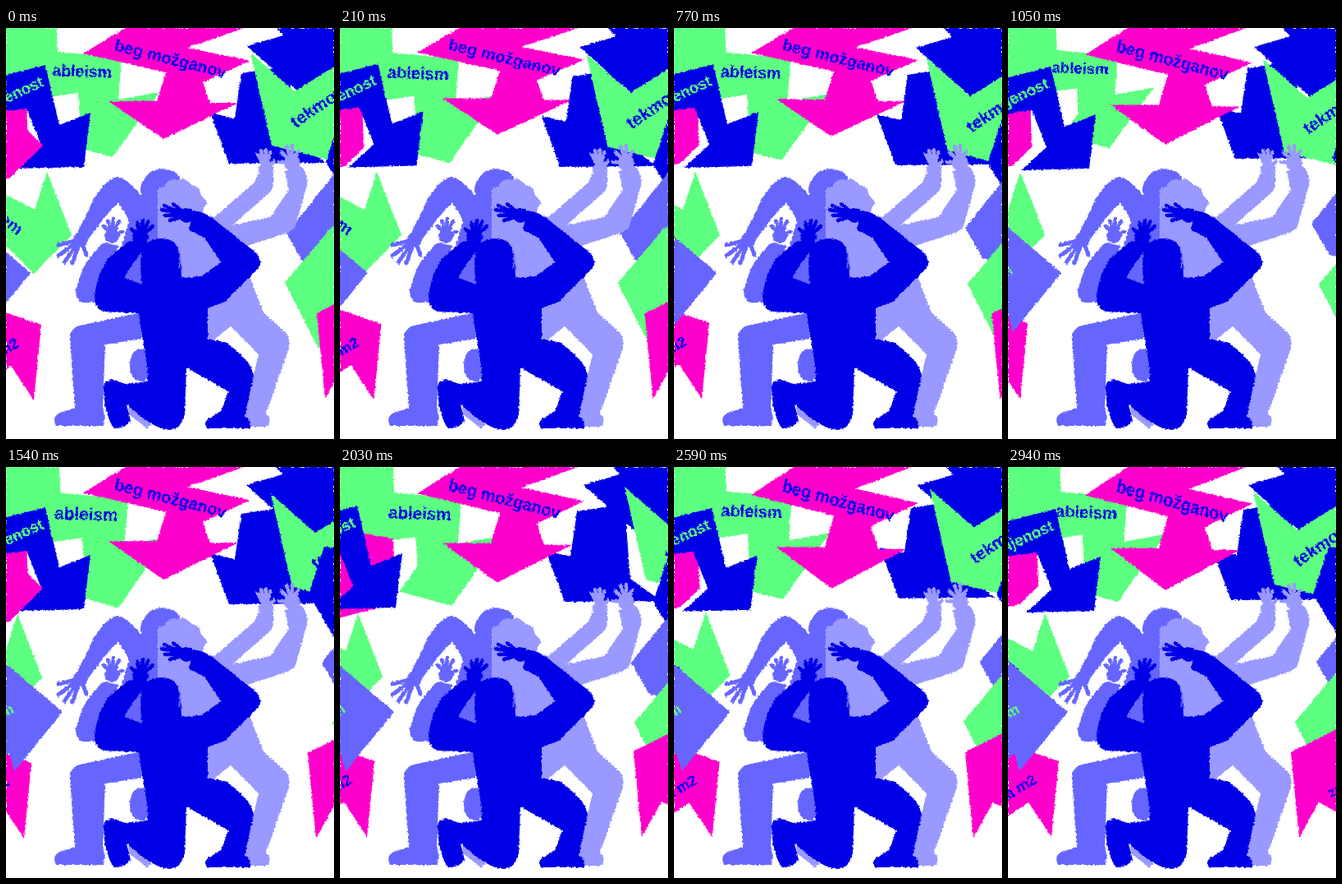
These frames come from a looping animation (400x500 px, 3.01 s). An HTML page:

```html
<!DOCTYPE html>
<html lang="sl">
<head>
<meta charset="utf-8">
<title>Pritiski</title>
<style>
  html, body { margin: 0; width: 100%; height: 100%; overflow: hidden; background: #fff; }
  svg { display: block; width: 100vw; height: 100vh; }
  text { font-family: "Liberation Sans", Arial, sans-serif; font-weight: bold; }
</style>
</head>
<body>
<svg id="stage" viewBox="0 0 400 500">
  <defs>
    <filter id="rough" filterUnits="userSpaceOnUse" x="0" y="0" width="400" height="500" color-interpolation-filters="sRGB">
      <feTurbulence type="fractalNoise" baseFrequency="0.35" numOctaves="2" seed="4"/>
      <feDisplacementMap in="SourceGraphic" scale="3.5" xChannelSelector="R" yChannelSelector="G"/>
    </filter>
  </defs>
  <rect width="400" height="500" fill="#fff"/>
  <g filter="url(#rough)">
    <g id="arrows"></g>
    <g id="people"></g>
  </g>
</svg>
<script>
const LOOP = 3010, STEP = 70;
const TIMES = [0, 490, 1050, 1540, 2030, 2310, 2940];
const PINK = '#ff00cc', BLUE = '#0000e6', GREEN = '#5cff7f', MID = '#6666ff', LIGHT = '#9999ff';

function add(parent, tag, attrs, text) {
  const el = document.createElementNS('http://www.w3.org/2000/svg', tag);
  for (const key in attrs) el.setAttribute(key, attrs[key]);
  if (text) el.textContent = text;
  parent.appendChild(el);
  return el;
}

// Back to front. "move" holds x,y offsets at TIMES; "grow" holds x,y scales from the top left.
const ARROWS = [
  { fill: GREEN, points: '-20,-10 61,-10 63,29 141,36 137,87 187,78 130,157 69,141 90,112 88,79 40,86 -20,90',
    label: ['ableism', 56, 58, 2, 19.6, BLUE],
    grow: [[1, 1], [1.07, 1.12], [.95, .93], [1.055, 1.09], [1.05, 1.075], [1.012, 1.013], [1.03, 1.045]] },
  { fill: PINK, points: '-30,70 65,87 67,150 44,172 -10,186',
    move: [[-40, 0], [-35, -10], [-38, -5], [-40, 0], [0, 0], [-40, 0], [-30, -5]] },
  { fill: BLUE, points: '-30,65 48,45 65,118 103,103 95,169 12,171 43,143 25,98 -30,105',
    label: ['preobremenjenost', 47, 70, -25, 19, GREEN, 'end'],
    move: [[0, 0], [-4, -4], [4, 2], [0, 4], [-27, 2], [-10, 4], [10, 6]] },
  { fill: PINK, points: '-20,80 0,98 45,143 4,183 -20,187',
    move: [[0, 0], [-60, 0], [-60, 0], [0, 5], [-60, 0], [-10, 5], [-60, 0]] },
  { fill: BLUE, points: '287,55 345,46 352,137 390,164 272,165 249,103 279,110',
    move: [[0, 0], [-9, 10], [5, -6], [0, 2], [2, -1], [3, -7], [0, -3]] },
  { fill: BLUE, points: '294,22 338,9 322,-8 430,-8 430,100 366,86',
    move: [[0, 0], [-4, 3], [6, 1], [-1, 0], [3, 0], [5, 1], [-1, 0]] },
  { fill: PINK, points: '94,31 147,-1 150,-12 325,-12 221,24 298,40 240,66 249,91 283,91 192,135 125,89 184,89 195,54',
    label: ['beg možganov', 131, 27, 14, 20, BLUE],
    grow: [[1, 1], [1, .9], [1, 1.05], [1, 1.015], [1, 1.04], [1, 1.085], [1, 1.11]] },
  { fill: GREEN, points: '298,30 352,77 450,16 450,175 380,157 324,143',
    label: ['tekmovalnost', 353, 122, -34, 21, BLUE],
    move: [[0, 0], [6, 4], [13, 8], [25, 3], [49, -6], [23, -6], [1, 0]] },
  { fill: BLUE, points: '388,97 369,155 405,215 460,215 460,105',
    move: [[21, 8], [0, 15], [27, 3], [0, 0], [13, 9], [40, 0], [3, 0]] },
  { fill: MID, points: '405,172 342,250 364,288 450,310 450,172',
    move: [[0, 0], [-2, -2], [28, -12], [43, -12], [13, -12], [28, -12], [34, -13]] },
  { fill: GREEN, points: '397,242 340,310 381,390 460,390 460,242',
    move: [[0, 0], [-3, 1], [39, 2], [58, 2], [19, 1], [15, -1], [10, 0]] },
  { fill: PINK, points: '345,347 420,309 420,430 379,408 355,451',
    label: ['zaslužek', 394, 403, -30, 18, BLUE],
    move: [[34, 0], [15, 1], [70, 0], [23, 1], [13, -1], [17, 0], [0, 0]] },
  { fill: GREEN, points: '50,175 80,252 34,299 -60,205 -60,172 0,203 35,221',
    label: ['seksizem', 14, 253, 38, 20, BLUE, 'end'],
    move: [[0, 0], [-13, 0], [-35, 0], [-36, 4], [-28, 3], [-16, 0], [-5, 3]] },
  { fill: PINK, points: '-60,316 10,340 62,358 53,450 25,408 -60,465',
    label: ['cena m2', 36, 384, -30, 18, BLUE, 'end'],
    move: [[-19, 3], [0, 1], [-38, 1], [-31, 2], [-20, 0], [-11, 1], [0, 0]] },
  { fill: MID, points: '-60,185 73,298 14,370 8,348 -60,410',
    label: ['kapitalizem', 15, 298, -30, 18, GREEN, 'end'],
    move: [[-43, 0], [-33, 0], [-8, 0], [-4, 0], [-7, 0], [-8, 0], [0, 0]] }
];

const arrowLayer = document.getElementById('arrows');
for (const arrow of ARROWS) {
  arrow.el = add(arrowLayer, 'g', {});
  add(arrow.el, 'polygon', { points: arrow.points, fill: arrow.fill });
  if (!arrow.label) continue;
  const [word, x, y, angle, size, fill, anchor = 'start'] = arrow.label;
  add(arrow.el, 'text', {
    transform: `translate(${x} ${y}) rotate(${angle})`, 'font-size': size, fill, 'text-anchor': anchor
  }, word);
}

const people = document.getElementById('people');
const body = (fill, d) => add(people, 'path', { fill, d });
const line = (stroke, d, width) => add(people, 'path', {
  d, stroke, fill: 'none', 'stroke-width': width, 'stroke-linecap': 'round', 'stroke-linejoin': 'round'
});

function hand(color, [x, y], radius, tips, width = 5) {
  add(people, 'circle', { cx: x, cy: y, r: radius, fill: color });
  for (const [tx, ty] of tips) line(color, `M${x + (tx - x) * .3} ${y + (ty - y) * .3}L${tx} ${ty}`, width);
}

// Rear left person
body(MID, `M168 186C174 168 202 166 212 182L214 215 190 300 165 345 165 378 121 385 118 462Q122 474 118 484
  L61 484Q56 474 64 469L84 462 78 380Q76 366 90 362L160 347 130 300 150 234 137 212 118 233 101 256
  87 249 106 210Q120 186 134 181Q146 181 165 204Q162 192 168 186Z`);
body(MID, 'M119 261Q104 274 93 294L85 319Q85 336 100 334L112 333 130 290 137 265Z');
add(people, 'ellipse', { cx: 164, cy: 410, rx: 13, ry: 20, fill: MID });
hand(MID, [91, 257], 9, [[64, 264], [64, 277], [71, 285], [81, 286], [98, 276]]);
hand(MID, [129, 253], 9, [[119, 241], [124, 234], [131, 232], [138, 235], [142, 248]], 4.5);

// Rear right person
body(LIGHT, `M185 205Q183 193 193 193Q198 182 208 185Q220 180 226 191Q237 192 237 202L246 213 241 219
  240 226 254 230 303 188 307 178 326 176Q328 192 322 200L276 240 322 230 345 197 340 174 359 168
  Q370 178 367 191L353 241Q350 248 334 252L285 268 300 310 314 346 341 371Q347 377 345 390
  L317 469Q325 476 319 485L288 485 292 462 308 397 274 363 250 382 180 340 185 250Z`);
body(LIGHT, 'M172 405L172 428 156 436 146 432 150 470 172 487 180 480 185 405Z');
hand(LIGHT, [317, 172], 9, [[307, 154], [311, 149], [317, 149], [322, 152], [327, 162]], 4.5);
hand(LIGHT, [349, 164], 10, [[333, 163], [336, 151], [342, 144], [349, 143], [356, 150]], 4.5);

// Front person
body(BLUE, `M166 270Q173 256 190 256Q211 257 213 279L214 304 238 302 262 285 242 255 223 246 228 222
  Q246 224 260 238L302 271Q315 282 308 292L267 333 246 341 246 378 270 383Q302 409 302 424
  L291 472Q300 476 298 487L245 487Q240 477 250 474L263 465 271 442 220 413 218 470Q214 488 200 489
  Q184 488 165 473L147 458 152 478Q142 489 131 486Q120 470 119 438Q119 427 132 428L145 433 173 430
  172 410 166 375 162 347 120 345Q107 342 108 325Q113 292 128 277L151 259 174 261 155 286 144 304 166 312
  Q162 287 166 270Z`);
line(LIGHT, 'M207 261Q215 276 211 292', 1);
hand(BLUE, [164, 254], 10, [[153, 245], [160, 237], [167, 234], [174, 235], [179, 241]], 4.5);
hand(BLUE, [220, 228], 9, [[190, 221], [193, 216], [204, 214], [194, 228], [200, 234]], 4.5);

const ease = u => (1 - Math.cos(Math.PI * u)) / 2;

function render(time) {
  const t = Math.floor((time % LOOP) / STEP) * STEP;
  let i = TIMES.length - 2;
  while (TIMES[i] > t) i--;
  const u = ease((t - TIMES[i]) / (TIMES[i + 1] - TIMES[i]));
  for (const { el, move, grow } of ARROWS) {
    const keys = move || grow;
    const [x, y] = keys[i].map((v, k) => v + (keys[i + 1][k] - v) * u);
    el.setAttribute('transform', `${move ? 'translate' : 'scale'}(${x} ${y})`);
  }
}

const start = performance.now();
function tick() {
  render(performance.now() - start);
  requestAnimationFrame(tick);
}
tick();
</script>
</body>
</html>
```
